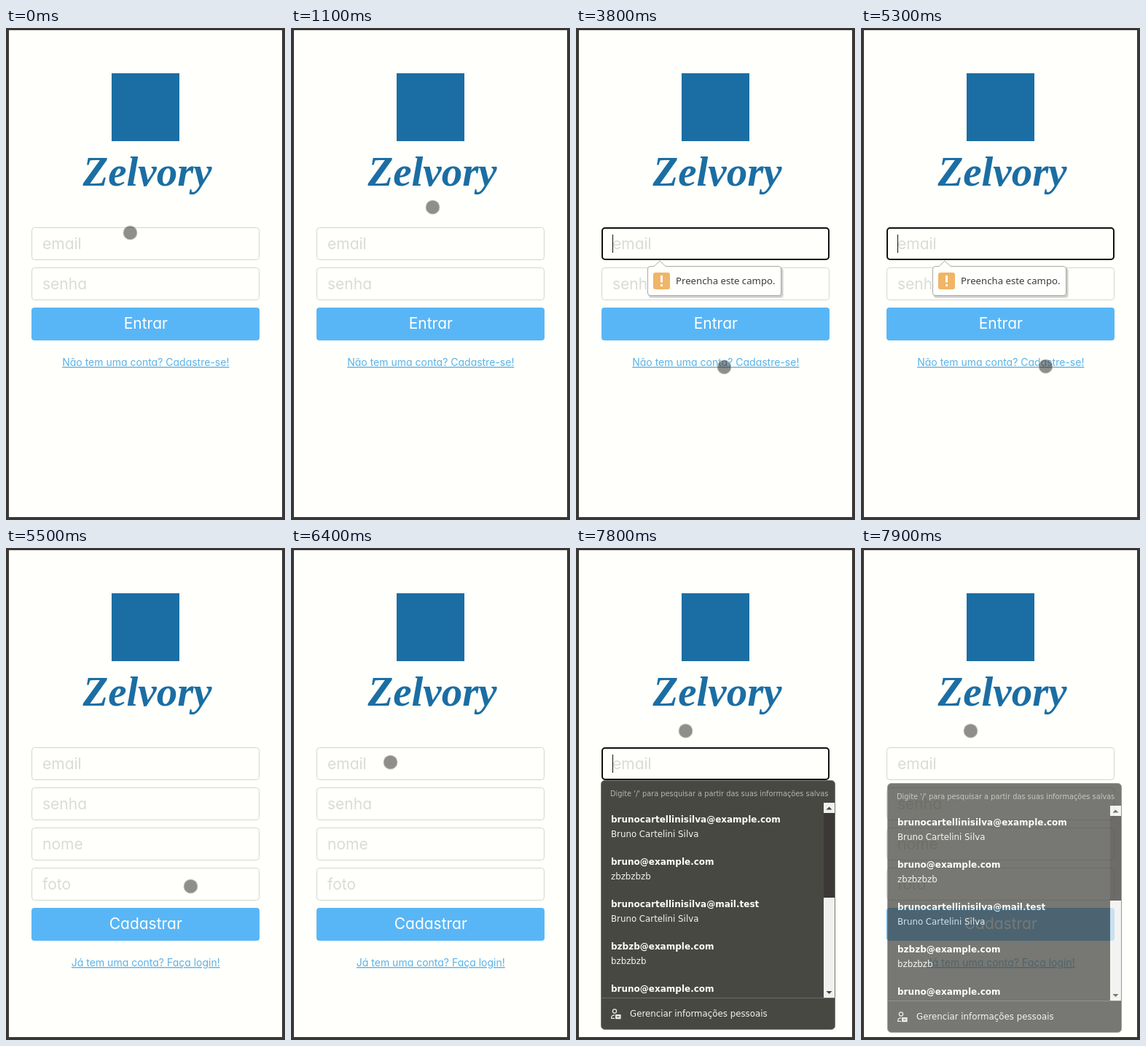
An HTML page that plays this animation: 383x674 px, repeating every 8 s.

```html
<!DOCTYPE html>
<html lang="pt-BR">
<head>
<meta charset="utf-8">
<title>Zelvory</title>
<style>
  html, body { margin: 0; width: 100%; height: 100%; overflow: hidden; background: #393735; }
  svg { display: block; width: 383px; height: 674px; }
  .app { font-family: Inter, Lato, sans-serif; font-feature-settings: "cv11"; }
  .brand { font: italic bold 57px "Liberation Serif", serif; fill: #1b6ea3; }
  .field { fill: #fff; fill-opacity: .4; stroke: #d3d5d1; }
  .hint { font-size: 21px; fill: #dadbd7; }
  .button { fill: #59b6f6; }
  .action { font-size: 21px; fill: #fff; }
  .link { font-size: 14px; fill: #59b2ea; text-decoration: underline; }
  .middle { text-anchor: middle; }
  .tip { font: 13.2px "Noto Sans", "Open Sans", sans-serif; fill: #3d3d3d; }
  .menu { font: 11.8px "DejaVu Sans", sans-serif; fill: #f3f3ef; }
  .menu .head { font-size: 9.8px; fill: #b6b5af; }
  .menu .mail { font-size: 12px; font-weight: bold; fill: #fdfdfa; }
</style>
</head>
<body>
<svg id="stage" viewBox="0 0 383 674"></svg>
<script>
const LOOP = 8000;

const text = (cls, x, y, s) => `<text class="${cls}" x="${x}" y="${y}">${s}</text>`;
const rowY = i => 273 + 55 * i;

const field = (label, i) =>
  `<rect class="field" x="35.5" y="${rowY(i) + .5}" width="312" height="44" rx="4"/>` +
  text("hint", 50, rowY(i) + 30, label);

const form = (id, labels, action, link) => {
  const y = rowY(labels.length);
  return `<g id="${id}">${labels.map(field).join("")}
    <rect class="button" x="35" y="${y}" width="313" height="45" rx="4"/>
    ${text("action middle", 191.8, y + 29, action)}
    ${text("link middle", 191.8, y + 80, link)}</g>`;
};

const focus = `<g id="focus" fill="none" stroke="#111">
  <rect x="36" y="274" width="311" height="43" rx="4" stroke-width="2"/>
  <path d="M50.5 283V308"/></g>`;

const tip = `<g id="tip">
  <rect x="100" y="329" width="185" height="41" rx="4" fill="#000" opacity=".1"/>
  <rect x="99" y="328" width="185" height="41" rx="4" fill="#000" opacity=".1"/>
  <path d="M102 326.5H107L115 319L123 326.5H278Q281.5 326.5 281.5 330V363Q281.5 366.5 278 366.5H102
    Q98.5 366.5 98.5 363V330Q98.5 326.5 102 326.5Z" fill="#fffffd" stroke="#aaa9a6"/>
  <rect x="106" y="335" width="23" height="23" rx="3" fill="#f0b566"/>
  <path d="M117.5 339V348.5M117.5 351V354" stroke="#fff" stroke-width="3"/>
  ${text("tip", 137, 351, "Preencha este campo.")}</g>`;

const people = [
  ["brunocartellinisilva@example.com", "Bruno Cartelini Silva"],
  ["bruno@example.com", "zbzbzbzb"],
  ["brunocartellinisilva@mail.test", "Bruno Cartelini Silva"],
  ["bzbzb@example.com", "bzbzbzb"],
  ["bruno@example.com", ""],
];

const person = ([mail, name], i) =>
  text("mail", 48, 376 + 58 * i, mail) + text("name", 48, 396 + 58 * i, name);

const menu = `<g id="menu" class="menu">
  <rect x="34.5" y="318.5" width="321" height="341" rx="5" fill="#484843" stroke="#777772"/>
  ${text("head", 47, 340, "Digite '/' para pesquisar a partir das suas informações salvas")}
  ${people.map(person).join("")}
  <rect x="340" y="349" width="15" height="267" fill="#f0f0ee"/>
  <rect x="340" y="363" width="15" height="116" fill="#3a3936"/>
  <path d="M343.5 358.5L347.5 354.5L351.5 358.5ZM343.5 607L347.5 611L351.5 607Z" fill="#444"/>
  <path d="M35 616.5H355" stroke="#6c6b67"/>
  <g fill="none" stroke="#e9e9e5" stroke-width="1.2">
    <circle cx="53" cy="634.5" r="2.6"/>
    <path d="M53 644.4H48.6V643Q49 640 53 639.8"/>
    <rect x="54.6" y="639.6" width="6.4" height="5" fill="#e9e9e5"/>
    <path d="M56 642H59.5" stroke="#484843"/>
  </g>
  ${text("foot", 74, 642, "Gerenciar informações pessoais")}</g>`;

const stage = document.getElementById("stage");
stage.innerHTML = `
  <rect width="383" height="674" fill="#393735"/>
  <rect x="4" y="3" width="375" height="667" fill="#fffffb"/>
  <rect x="145" y="62" width="93" height="93" fill="#1b6ea3"/>
  ${text("brand middle", 194, 216, "Zelvory")}
  <g class="app">
    ${form("login", ["email", "senha"], "Entrar", "Não tem uma conta? Cadastre-se!")}
    ${form("signup", ["email", "senha", "nome", "foto"], "Cadastrar", "Já tem uma conta? Faça login!")}
  </g>
  ${focus}${tip}${menu}
  <g id="pointer">
    <circle r="10.2" fill="none" stroke="#fff" stroke-opacity=".35" stroke-width="1.5"/>
    <circle r="9.5" fill="#201d1a" fill-opacity=".5"/>
  </g>`;

// Each row is [ms, value]; a value holds until the next row.
function hold(sel, prop, rows) {
  const frames = rows.map(([ms, v]) => ({ offset: ms / LOOP, [prop]: v, easing: "step-end" }));
  frames.push({ offset: 1, [prop]: rows[rows.length - 1][1] });
  stage.querySelector(sel).animate(frames, { duration: LOOP, iterations: Infinity });
}

const move = (x, y) => `translate(${x}px, ${y}px)`;

const path = [
  [0, 170.5, 280.5], [300, 170.5, 285.5], [500, 172, 291], [600, 175.5, 296.5],
  [900, 188, 282], [1000, 197.5, 258], [1100, 194.5, 245.5],
  [1400, 193.5, 270], [1500, 192, 325], [1600, 191.5, 364.5],
  [1800, 196.5, 386], [1900, 194, 409], [2000, 192.5, 417.5],
  [3500, 194, 427], [3600, 199, 445], [3700, 203, 459], [3800, 203.5, 464.5],
  [4200, 196, 463.5], [4500, 200.5, 463.5], [4800, 194.5, 463.5],
  [5100, 222, 463.5], [5200, 264.5, 463.5], [5300, 253.5, 463.5],
  [6000, 247, 440], [6100, 223, 385], [6200, 184, 330], [6300, 150, 301], [6400, 136.5, 293.5],
  [7200, 135.5, 294.5], [7300, 134.5, 295.5],
  [7700, 143, 274], [7800, 150.5, 250.5],
];

hold("#pointer", "transform", path.map(([ms, x, y]) => [ms, move(x, y)]));
hold("#login", "opacity", [[0, 1], [5500, 0]]);
hold("#signup", "opacity", [[0, 0], [5500, 1]]);
hold("#login .button", "fill", [[0, "#59b6f6"], [2600, "#50b0ee"], [2700, "#59b6f6"]]);
hold("#login .action", "opacity", [[0, 1], [2600, .5], [2700, 1]]);
hold("#focus", "opacity", [[0, 0], [2600, 1], [5500, 0], [6500, 1], [7900, 0]]);
hold("#tip", "opacity", [[0, 0], [2700, .5], [2800, 1], [5500, 0]]);
hold("#menu", "opacity", [[0, 0], [6500, 1], [7900, .74]]);
hold("#menu", "transform", [[0, move(0, 0)], [7900, move(2, 4)]]);
</script>
</body>
</html>
```
